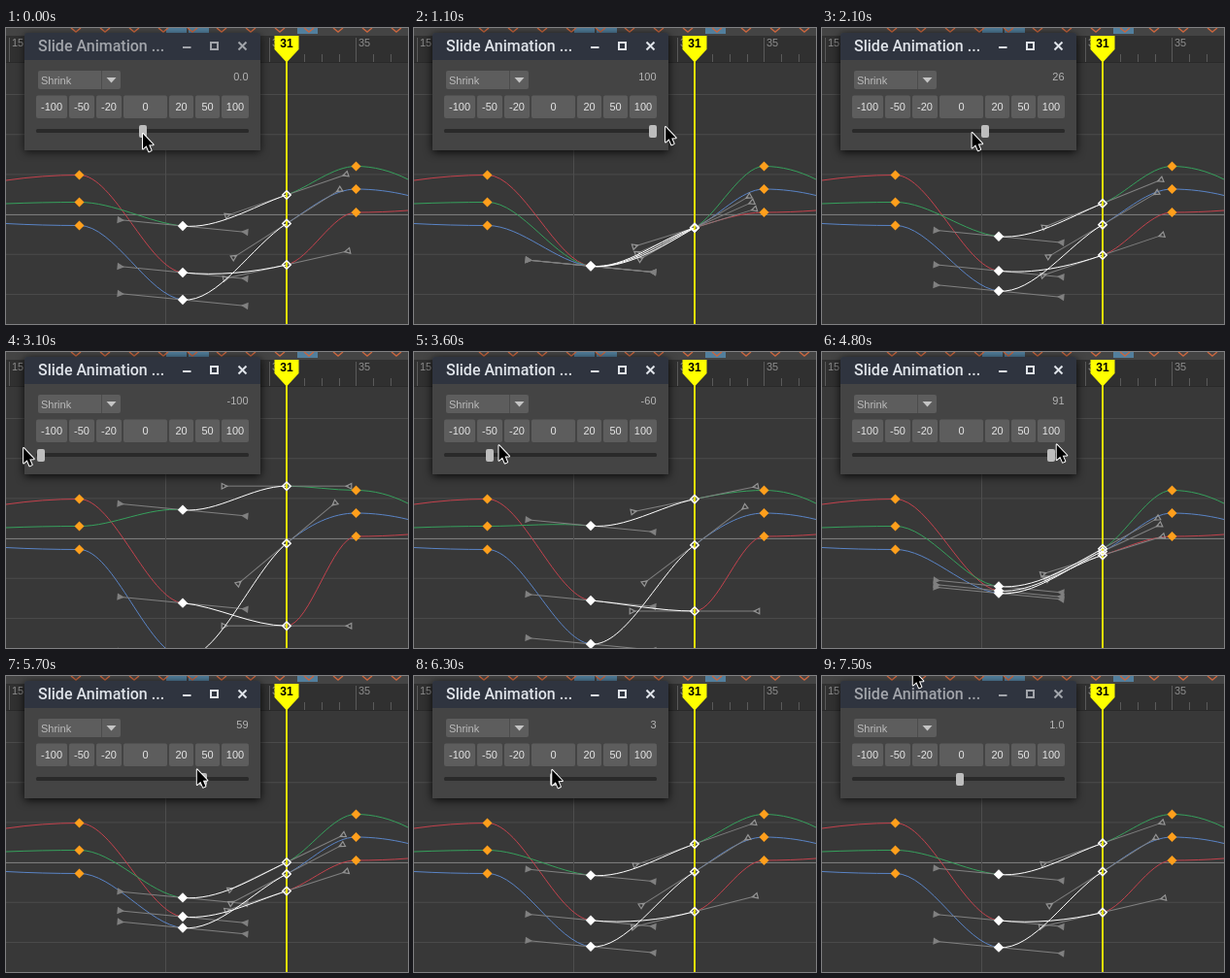
An HTML page with a canvas that plays this animation: 414x305 px, repeating every 7600 ms.

```html
<!DOCTYPE html>
<html lang="en">
<head>
<meta charset="utf-8">
<title>Slide Animation</title>
<style>
  html, body { margin: 0; width: 100%; height: 100%; overflow: hidden; background: #383838; }
  canvas { display: block; }
</style>
</head>
<body>
<canvas id="stage" width="414" height="305"></canvas>
<script>
const g = document.getElementById('stage').getContext('2d');
const LOOP = 7600, STEP = 100;
const PRESS = 400, RELEASE = 6700, BLUR = 7300;
const SANS = '"Liberation Sans", Arial, sans-serif';
const FRAME_WIDTH = 17.85, PLAYHEAD = 289;
const X = [75.5, 182, PLAYHEAD, 360.5];
const FIXED_SLOPE = 0.097, HANDLE = 64;

// Key heights at the four X positions, plus the heights at both stage edges
const curves = [
  { color: '#c4424d', left: 157, y: [151.5, 252, 244, 190], right: 188 },
  { color: '#36a05c', left: 181, y: [179.5, 204, 172, 142.5], right: 156 },
  { color: '#5a84c6', left: 201.5, y: [203.5, 280, 201.5, 166], right: 172.5 }
];
const mean = i => curves.reduce((sum, c) => sum + c.y[i], 0) / curves.length;

// The pull of the mouse in slider units; it overshoots the ends, the slider is clamped
const pull = [
  [400, 0], [1100, 105], [1350, 120], [1470, 120], [2100, 26], [2950, -132],
  [3050, -132], [3170, -117], [4100, 3], [5050, 102], [5700, 59], [6400, 1],
  [6670, 1], [7100, -52], [7400, -52], [7570, -45]
];
const pointerHeight = [
  [300, 109], [1100, 102], [2100, 108], [3100, 99], [4100, 95],
  [6600, 97], [7100, -24], [7400, -24], [7500, -6]
];
const LEAD = 70; // ms by which the pointer is ahead of the slider

const sliderX = value => 141 + value * 1.05;
const sliderValue = t => Math.max(-100, Math.min(100, track(pull, Math.min(t, 6600))));

// Slope through the middle of three keys that never overshoots
function autoSlope(a, b, c) {
  const s = (b[1] - a[1]) / (b[0] - a[0]), r = (c[1] - b[1]) / (c[0] - b[0]);
  if (s * r <= 0) return 0;
  const m = (c[1] - a[1]) / (c[0] - a[0]);
  return Math.sign(m) * Math.min(Math.abs(m), 3 * Math.abs(s), 3 * Math.abs(r));
}

function track(k, t) {
  const last = k.length - 1;
  if (t <= k[0][0]) return k[0][1];
  if (t >= k[last][0]) return k[last][1];
  const i = k.findIndex(e => e[0] > t) - 1;
  const slope = n => n > 0 && n < last ? autoSlope(k[n - 1], k[n], k[n + 1]) : 0;
  const [a, b] = [k[i], k[i + 1]], d = b[0] - a[0], u = (t - a[0]) / d;
  return a[1] + (b[1] - a[1]) * u * u * (3 - 2 * u)
    + d * u * (1 - u) * (slope(i) * (1 - u) - slope(i + 1) * u);
}

function rect(x, y, w, h, color, radius = 0) {
  g.fillStyle = color;
  g.beginPath();
  g.roundRect(x, y, w, h, radius);
  g.fill();
}

function line(color, width, ...p) {
  g.strokeStyle = color;
  g.lineWidth = width;
  g.beginPath();
  for (let i = 0; i < p.length; i += 2) g.lineTo(p[i], p[i + 1]);
  g.stroke();
}

function poly(points, fill, stroke, width = 1) {
  g.beginPath();
  points.forEach(p => g.lineTo(...p));
  g.closePath();
  if (stroke) { g.strokeStyle = stroke; g.lineWidth = width; g.stroke(); }
  if (fill) { g.fillStyle = fill; g.fill(); }
}

function text(s, x, y, color, align = 'left', font = '11px ' + SANS) {
  g.font = font;
  g.fillStyle = color;
  g.textAlign = align;
  g.fillText(s, x, y);
}

function segment(color, x0, y0, m0, x1, y1, m1) {
  const d = (x1 - x0) / 3;
  g.strokeStyle = color;
  g.lineWidth = 1;
  g.beginPath();
  g.moveTo(x0, y0);
  g.bezierCurveTo(x0 + d, y0 + m0 * d, x1 - d, y1 - m1 * d, x1, y1);
  g.stroke();
}

function diamond(x, y, r, fill, stroke, width) {
  poly([[x, y - r], [x + r, y], [x, y + r], [x - r, y]], fill, stroke, width);
}

// Both tangent handles of a key, their arrowheads pointing at it
function handles(x, y, slope, hollow) {
  const size = hollow ? 2.8 : 3.7;
  g.save();
  g.translate(x, y);
  g.rotate(Math.atan(slope));
  line('#808080', 1, -HANDLE, 0, HANDLE, 0);
  for (const s of [-1, 1]) {
    const c = s * HANDLE;
    poly([[c - s * size, 0], [c + s * size, -size], [c + s * size, size]],
      hollow ? '' : '#808080', hollow && '#949494', 1.2);
  }
  g.restore();
}

function drawBackdrop() {
  rect(0, 0, 414, 305, '#383838');
  for (let y = 68.5; y < 305; y += 41.2) line('#4a4a4a', 1, 0, y, 414, y);
  line('#7a7a7a', 1, 0, 192.5, 414, 192.5);
  line('#4d4d4d', 1, 164.5, 36, 164.5, 305);

  rect(0, 8, 414, 27, '#303030');
  rect(0, 35, 414, 1, '#292929');
  for (let f = 15; f < 39; f++) {
    const x = Math.round(PLAYHEAD + (f - 31) * FRAME_WIDTH) + .5;
    line('#5a5a5a', 1, x, f % 5 ? 27 : 10, x, 35);
    if (f % 5 === 0) text(f, x + 2.5, 19, '#8e8e8e');
  }

  rect(0, 0, 414, 8, '#444');
  for (const x of [165, 188, 300]) rect(x, 0, 21, 6, '#527f9d');
  for (let x = 67; x < 414; x += 30) line('#c8663f', 1.4, x, 0, x + 5, 4, x + 10, 0);
}

function drawGraph(value) {
  const shrink = (v, i) => i === 1 || i === 2 ? v + (mean(i) - v) * value / 100 : v;
  const shrunk = curves.map(c => {
    const y = c.y.map(shrink);
    return { ...c, y, slope: autoSlope([X[1], y[1]], [X[2], y[2]], [X[3], y[3]]) };
  });
  for (const { color, left, right, y, slope } of shrunk) {
    segment(color, 0, left, 2 * (y[0] - left) / X[0], X[0], y[0], 0);
    segment(color, X[0], y[0], 0, X[1], y[1], FIXED_SLOPE);
    segment(color, X[2], y[2], slope, X[3], y[3], 0);
    segment(color, X[3], y[3], 0, 414, right, 2 * (right - y[3]) / (414 - X[3]));
  }
  for (const { y, slope } of shrunk) {
    handles(X[1], y[1], FIXED_SLOPE, false);
    handles(X[2], y[2], slope, true);
  }
  for (const { y, slope } of shrunk) segment('#fff', X[1], y[1], FIXED_SLOPE, X[2], y[2], slope);

  rect(PLAYHEAD - 1, 34, 2, 271, '#e6e200');
  const [l, r] = [PLAYHEAD - 12.5, PLAYHEAD + 12.5];
  poly([[l, 8], [r, 8], [r, 22], [PLAYHEAD, 35.5], [l, 22]], '#ff0');
  text('31', PLAYHEAD, 19.5, '#000', 'center', 'bold 12px ' + SANS);

  for (const { y } of shrunk) {
    diamond(X[0], y[0], 5, '#ff9f1c');
    diamond(X[3], y[3], 5, '#ff9f1c');
    diamond(X[1], y[1], 5.2, '#fff');
    diamond(X[2], y[2], 4.2, '', '#fff', 1.5);
  }
}

function drawWindow(value, active, dragging) {
  g.save();
  g.shadowColor = active ? 'rgba(0,0,0,.85)' : 'rgba(0,0,0,.65)';
  g.shadowBlur = active ? 10 : 8;
  g.shadowOffsetY = 2;
  rect(19, 5, 243, 121, '#444', [3, 3, 0, 0]);
  g.restore();
  rect(19, 5, 243, 28, '#2f343f', [3, 3, 0, 0]);

  const ink = active ? '#e0e4ea' : '#a2a5ab';
  text('Slide Animation ...', 33, 24, ink, 'left', '500 16px Roboto, "Noto Sans", sans-serif');
  line(ink, 2, 182, 20, 190.5, 20);
  g.strokeRect(211, 15, 7, 7);
  line(ink, 2, 239.5, 14.5, 247.5, 22.5);
  line(ink, 2, 247.5, 14.5, 239.5, 22.5);

  rect(33, 44, 85, 19, '#5d5d5d', 2);
  line('#4c4c4c', 1, 98.5, 44, 98.5, 63);
  poly([[103.5, 51], [113.5, 51], [108.5, 56.5]], '#c4c4c4');
  text('Shrink', 36, 58, '#bbb');
  text(dragging ? Math.round(value) : value.toFixed(1), 249.5, 54, '#b4b4b4', 'right');

  let x = 31;
  for (const label of [-100, -50, -20, 0, 20, 50, 100]) {
    const w = label ? Math.max(25, Math.round(g.measureText(label).width) + 10) : 45;
    rect(x, 69.5, w, 23.5, '#5d5d5d', 2);
    text(label, x + w / 2, 85, '#e4e4e4', 'center');
    x += w + 2;
  }
  rect(31, 104, 219, 4, '#2a2a2a', 1.5);
  rect(Math.round(sliderX(value)) - 4, 100, 8, 13, '#bdbdbd', 2);
}

function drawPointer(x, y) {
  g.save();
  g.translate(x, y);
  g.lineJoin = 'round';
  poly([[0, 0], [0, 15.5], [3.6, 12.3], [6.2, 18.3], [8.6, 17.2], [6.1, 11.4], [10.6, 11.2]],
    '#000', '#fff', 2);
  g.restore();
}

function frame() {
  const t = Math.floor((performance.now() - start) % LOOP / STEP) * STEP;
  const value = sliderValue(t);
  drawBackdrop();
  drawGraph(value);
  drawWindow(value, t >= PRESS && t < BLUR, t >= PRESS && t < RELEASE);
  drawPointer(sliderX(track(pull, t + LEAD)), track(pointerHeight, t));
  requestAnimationFrame(frame);
}
const start = performance.now();
frame();
</script>
</body>
</html>
```
